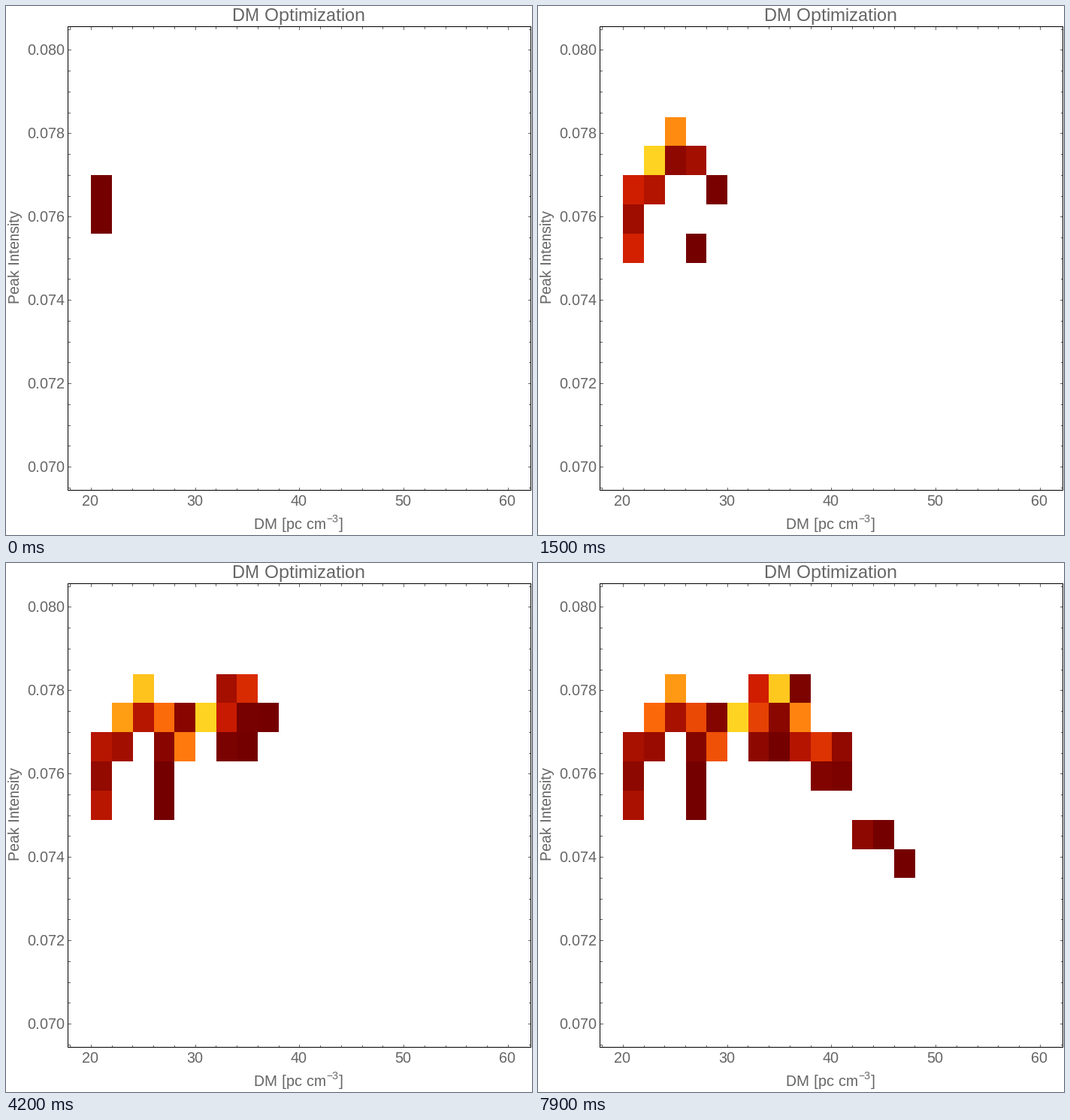
A matplotlib script that plays this animation: 700 px wide and 704 px high, repeating every 8000 ms.

```python
import matplotlib.pyplot as plt
import numpy as np
from matplotlib.animation import FuncAnimation
from matplotlib.colors import LinearSegmentedColormap
from matplotlib.patches import Rectangle

W, H, DPI = 700, 704, 64
FRAMES, STEP = 80, 100
LEFT, RIGHT, TOP, BOTTOM = 82, 698, 27, 644
GREY = "#666666"
SOLAR = LinearSegmentedColormap.from_list("solar", [
    (0, "#750000"), (.3, "#d01d00"), (.43, "#e64104"),
    (.6, "#ff700b"), (.75, "#ffa515"), (1, "#ffd322")], N=512)

plt.rcParams.update({"text.hinting": "native", "text.hinting_factor": 1})
fig = plt.figure(figsize=(W / DPI, H / DPI), dpi=DPI, facecolor="white")
ax = fig.add_axes([0, 0, 1, 1])
ax.set_xlim(0, W)
ax.set_ylim(H, 0)
ax.axis("off")


def box(x, y, w, h, color, z=1):
    r = Rectangle((x, y), w, h, facecolor=color, linewidth=0,
                  antialiased=False, zorder=z)
    return ax.add_patch(r)


def text(x, y, s, size=20, ha="center", **kw):
    ax.text(x, y, s, fontsize=size * 72 / DPI, color=GREY, ha=ha,
            va="baseline", family="Liberation Sans", **kw)


# ---- axes ----
def draw_axes():
    for i in range(-1, 21):
        x = round(113 + 27.74 * i)
        size = 3 if i % 5 else 4
        box(x, TOP, 1, size + 1, GREY, 3)
        box(x, BOTTOM - size + 1, 1, size, GREY, 3)
    for i in range(-1, 22):
        y = int(58.9 + 27.73 * i)
        size = 3 if i % 4 else 4
        box(LEFT, y, size + 1, 1, GREY, 3)
        box(RIGHT - size + 1, y, size, 1, GREY, 3)
    for x in (LEFT, RIGHT):
        box(x, TOP, 1, BOTTOM - TOP + 1, "black", 4)
    for y in (TOP, BOTTOM):
        box(LEFT, y, RIGHT - LEFT + 1, 1, "black", 4)

    for i in range(5):
        text(112.5 + 138.7 * i, 665, str(20 + 10 * i))
    for i in range(6):
        text(78, 65 + 111 * i, f"{0.080 - 0.002 * i:.3f}", ha="right")

    text(389.5, 20, "DM Optimization", 24)
    text(18, 334.5, "Peak Intensity", rotation=90, rotation_mode="anchor")
    text(330, 696, "DM [pc cm", ha="left")
    text(426, 687, "\u22123", 14, ha="left")
    text(442.5, 696, "]", ha="left")


# ---- histogram ----
def col_x(k):
    return round(113.3 + 27.74 * k)


def row_y(k):
    return round(147.6 + 38.82 * k)


cells = []


def column(col, row, *bins):
    """Stack bins downwards from `row`; each is (first step, final count)."""
    end = min(6 + 9 * col, FRAMES - 1)
    for r, (start, count) in enumerate(bins, row):
        x, y = col_x(col), row_y(r)
        patch = box(x, y, col_x(col + 1) - x, row_y(r + 1) - y, "white", 2)
        cells.append((patch, start, end, count))


column(0, 2, (0, .43), (0, .2), (1, .45))
column(1, 1, (3, 1.45), (2, .3))
column(2, 0, (5, 1.82), (10, .43))
column(3, 1, (8, 1.16), (20, .13), (26, 0), (14, 0))
column(4, 1, (34, .13), (13, 1.25))
column(5, 1, (21, 2.55))
column(6, 0, (28, .77), (24, 1.1), (35, .2))
column(7, 0, (27, 2.4), (36, .18), (37, 0))
column(8, 0, (50, .07), (42, 1.67), (51, .53))
column(9, 2, (55, .97), (62, .1))
column(10, 2, (59, .24), (70, .06))
column(11, 5, (70, .2))
column(12, 5, (79, 0))
column(13, 6, (79, 0))


def filled(now, start, end):
    u = np.clip((now - start) / max(end - start, 1), 0, 1)
    return u * u * (3 - 2 * u)


def update(frame):
    # samples arrive every step at first, later only every fourth
    now = frame if frame < 63 else frame - (frame - 63) % 4
    counts = [n * filled(now, a, b) for _, a, b, n in cells]
    peak = max(counts) or 1
    for (patch, start, _, _), n in zip(cells, counts):
        patch.set_visible(now >= start)
        patch.set_facecolor(SOLAR(float(n / peak)))
    return [c[0] for c in cells]


draw_axes()
anim = FuncAnimation(fig, update, frames=FRAMES, interval=STEP,
                     init_func=lambda: update(0), repeat=True,
                     repeat_delay=0, blit=False)
plt.show()
```
